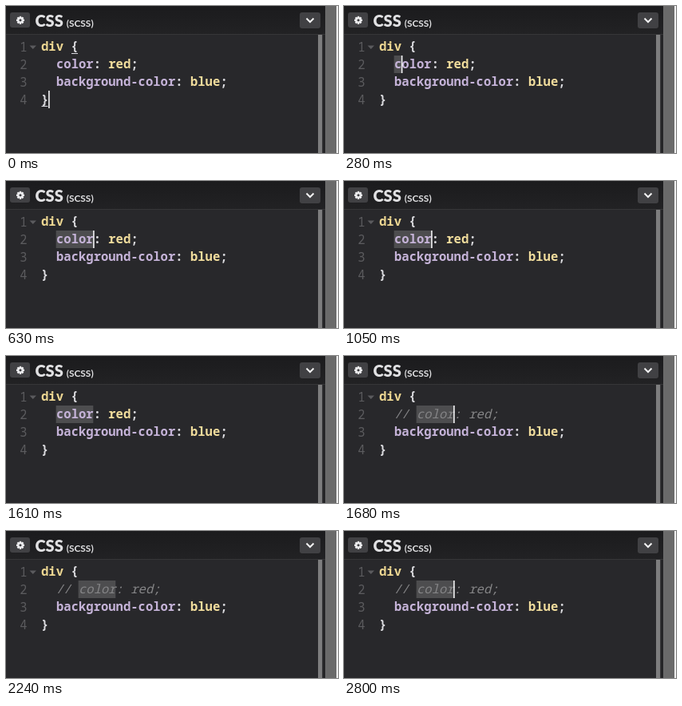
Write an HTML page that moves like this. It is 416 px wide and 184 px high and loops after 3.29 s.

```html
<!DOCTYPE html>
<html lang="en">
<head>
<meta charset="utf-8">
<title>SCSS comment toggle</title>
<style>
html, body { margin: 0; width: 100%; height: 100%; overflow: hidden; background: #28282b; }
svg { display: block; width: 416px; height: 184px; }
.code { font: 600 15.55px "Noto Sans Mono", monospace; white-space: pre; }
.num { fill: #5b5b5e; text-anchor: end; font-weight: 400; }
.sel { fill: #ecd692; font-weight: 700; }
.prop { fill: #c5b3d8; }
.val { fill: #f0dc9c; font-weight: 700; }
.punc { fill: #dcdce0; }
.note { fill: #858587; font-style: italic; font-weight: 400; }
.title { font-family: Lato, sans-serif; fill: #e0e0e2; }
</style>
</head>
<body>
<svg viewBox="0 0 416 184">
  <defs>
    <linearGradient id="head" x2="0" y2="1">
      <stop stop-color="#1b1b1d"/><stop offset="1" stop-color="#222224"/>
    </linearGradient>
  </defs>
  <rect width="416" height="184" fill="#28282b"/>
  <rect width="400" height="36" fill="url(#head)"/>
  <rect y="35" width="400" height="1" fill="#363638"/>
  <rect x="391" y="36" width="5.5" height="148" fill="#7d7d7e"/>
  <rect x="396.5" y="36" width="3.5" height="148" fill="#252527"/>
  <rect x="400" width="14" height="184" fill="#6a6a6a"/>
  <rect x="414" width="2" height="184" fill="#efefef"/>

  <rect x="5" y="8" width="25" height="19" rx="3" fill="#414144"/>
  <g id="gear" transform="translate(18 17.8)" fill="#efeff1"></g>
  <text class="title" x="36.5" y="25.7" font-size="20" font-weight="900">CSS</text>
  <text class="title" x="75.7" y="25.7" font-size="11.9" font-weight="700">(SCSS)</text>
  <rect x="368" y="8" width="26" height="20" rx="3" fill="#414144"/>
  <path d="M376.5 15.5l4.5 4.5 4.5-4.5" fill="none" stroke="#f2f2f3" stroke-width="2"/>

  <rect id="mark" y="62" height="22" fill="#4d4d4f"/>
  <path d="M29.5 49.5h8.5l-4.25 4.5z" fill="#5b5b5e"/>
  <g id="nums"></g>
  <text class="code" x="44" y="56"><tspan class="sel">div</tspan><tspan class="punc"> {</tspan></text>
  <text class="code" id="live" x="63" y="78"><tspan class="prop">color</tspan><tspan class="punc">: </tspan><tspan class="val">red</tspan><tspan class="punc">;</tspan></text>
  <text class="code note" id="off" x="63" y="78">// color: red;</text>
  <text class="code" x="63" y="100"><tspan class="prop">background-color</tspan><tspan class="punc">: </tspan><tspan class="val">blue</tspan><tspan class="punc">;</tspan></text>
  <text class="code punc" x="44" y="122.5">}</text>
  <path id="pair" d="M82 59.5h8M44.5 125.5h8" stroke="#d9d9df" stroke-width="1.2"/>
  <rect id="caret" width="1.6" height="22" fill="#f4f4f6"/>
</svg>
<script>
const LOOP = 3290, CHAR = 9.33, LEFT = 44, TOP = 40, ROW = 22;
const BLINK = 560, COMMENT = 1680;
const $ = id => document.getElementById(id);

// Key presses: time, row, caret column, selected characters
const keys = [
  [0, 3, 1, 0], [70, 2, 1, 0], [140, 1, 1, 0], [210, 1, 2, 0],
  [280, 1, 3, 1], [350, 1, 4, 2], [420, 1, 5, 3], [490, 1, 6, 4],
  [630, 1, 7, 5], [COMMENT, 1, 10, 5]
];

function set(el, attrs) {
  for (const name in attrs) el.setAttribute(name, attrs[name]);
}
function show(id, on) {
  $(id).style.display = on ? "" : "none";
}

function draw(t) {
  const [start, row, col, count] = keys.filter(k => k[0] <= t).pop();
  const x = LEFT + col * CHAR;
  const commented = t >= COMMENT;
  set($("caret"), { x: x - 0.2, y: TOP + row * ROW });
  set($("mark"), { x: x - count * CHAR, width: count * CHAR });
  show("caret", Math.floor((t - start) / BLINK) % 2 === 0);
  show("live", !commented);
  show("off", commented);
  show("pair", row === 3);
}

function build() {
  const teeth = Array.from({ length: 8 }, (_, i) =>
    `<rect x="-1.2" y="-5" width="2.4" height="3" transform="rotate(${i * 45})"/>`);
  $("gear").innerHTML = teeth.join("") +
    '<circle r="2.7" fill="none" stroke="#efeff1" stroke-width="2.2"/>';
  $("nums").innerHTML = [1, 2, 3, 4].map(n =>
    `<text class="code num" x="26.5" y="${34.5 + n * ROW}">${n}</text>`).join("");
}

build();
draw(0);
const begin = performance.now();
function tick() {
  draw((performance.now() - begin) % LOOP);
  requestAnimationFrame(tick);
}
requestAnimationFrame(tick);
</script>
</body>
</html>
```
